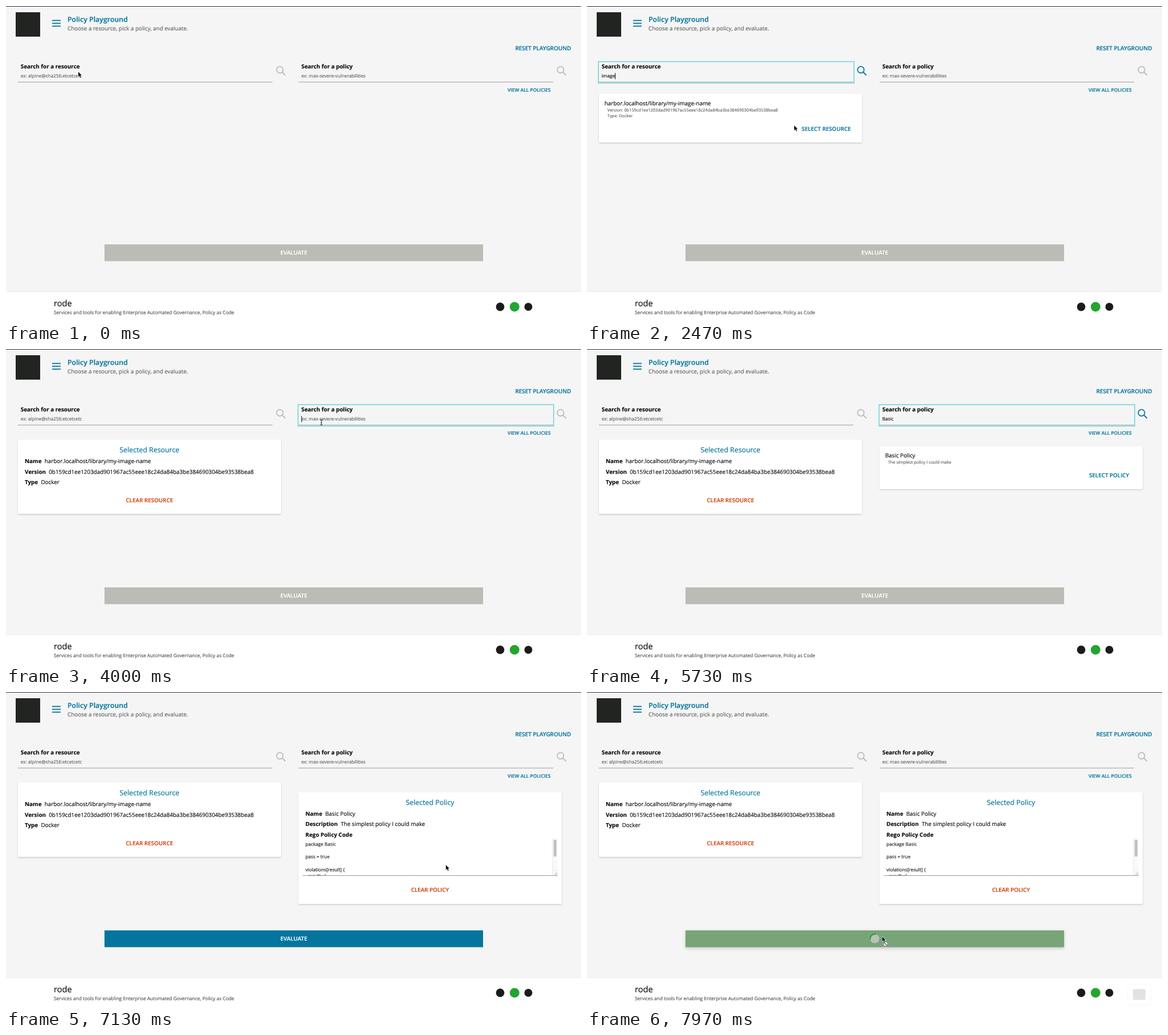
These frames come from a looping animation (1010 by 555 pixels, 8 s). An HTML page with a canvas:

```html
<!DOCTYPE html>
<html lang="en">
<head>
<meta charset="utf-8">
<title>Policy Playground</title>
<style>
html, body { margin: 0; width: 100%; height: 100%; overflow: hidden; background: #f5f5f5; }
canvas { display: block; width: 1010px; height: 555px; }
</style>
</head>
<body>
<canvas id="stage" width="1010" height="555"></canvas>
<script>
const ctx = document.getElementById('stage').getContext('2d');
const LOOP = 8000;
const FAMILY = '"Open Sans", "Noto Sans", sans-serif';
const HASH = '0b159cd1ee1203dad901967ac55eee18c24da84ba3be384690304be93538bea8';
const IMAGE = 'harbor.localhost/library/my-image-name';
const SUMMARY = 'The simplest policy I could make';

const BLUE = [5, 117, 158], GREY = [187, 188, 181], GREEN = [16, 122, 67], PALE = [119, 165, 119];
const INK = '#111', DIM = '#666', RED = '#d2450f', RULE = '#808080';
const MD = 9.87, SM = 8.21, XS = 7.4, LG = 12.38;

// Key moments in ms
const T = {
  focusA: 30, typeA: [900, 1020, 1150, 1290, 1430], listA: 1630, pickA: 2770,
  focusB: 3600, typeB: [4400, 4500, 4600, 4700, 4800], listB: 4980, pickB: 6420,
  send: 7670, toast: 7850
};

// Pointer moves: start, end, from, bend, to
const MOVES = [
  [400, 670, 127, 119, 132, 118, 137, 117],
  [1930, 2730, 137, 117, 323, 216, 415, 217],
  [2790, 3570, 415, 217, 500, 185, 554, 129],
  [5740, 6310, 554, 129, 760, 185, 922, 226],
  [6830, 7560, 922, 226, 720, 335, 518.5, 431]
];

const clamp = v => Math.max(0, Math.min(1, v));
const smooth = u => u * u * (3 - 2 * u);
const rgb = c => `rgb(${c.map(Math.round).join(',')})`;
const mix = (a, b, u) => a.map((v, i) => v + (b[i] - v) * u);

// CSS "ease" curve: cubic-bezier(.25, .1, .25, 1)
function ease(x) {
  x = clamp(x);
  let lo = 0, hi = 1, s = x;
  for (let i = 0; i < 16; i++) {
    s = (lo + hi) / 2;
    const bx = .75 * s * (1 - s) * (1 - s) + .75 * s * s * (1 - s) + s ** 3;
    if (bx < x) lo = s; else hi = s;
  }
  return .3 * s * (1 - s) * (1 - s) + 3 * s * s * (1 - s) + s ** 3;
}
const since = (t, start, span) => ease((t - start) / span);

// A hairline stroke gives the slightly heavier stems of smoothed text
function text(str, x, y, size, color = INK, weight = 400, align = 'left') {
  ctx.font = `${weight} ${size}px ${FAMILY}`;
  ctx.textRendering = 'geometricPrecision';
  ctx.textAlign = align;
  ctx.fillStyle = ctx.strokeStyle = color;
  ctx.lineWidth = .18;
  ctx.fillText(str, x, y);
  ctx.strokeText(str, x, y);
  return ctx.measureText(str).width;
}

function box(x, y, w, h, fill) {
  ctx.fillStyle = fill;
  ctx.fillRect(x, y, w, h);
}

function disc(x, y, r, fill) {
  ctx.beginPath();
  ctx.arc(x, y, r, 0, 7);
  ctx.fillStyle = fill;
  ctx.fill();
}

function line(x1, y1, x2, y2, color, width) {
  ctx.beginPath();
  ctx.moveTo(x1, y1);
  ctx.lineTo(x2, y2);
  ctx.strokeStyle = color;
  ctx.lineWidth = width;
  ctx.stroke();
}

function shadow(alpha, blur, dy, draw) {
  ctx.save();
  ctx.shadowColor = `rgba(0,0,0,${alpha})`;
  ctx.shadowBlur = blur;
  ctx.shadowOffsetY = dy;
  draw();
  ctx.restore();
}

const card = (x, y, w, h) => shadow(.18, 2.5, 1, () => box(x, y, w, h, '#fff'));

function pair(name, value, x, y) {
  const w = text(name, x, y, MD, INK, 700);
  text(value, x + w + 5.2, y, MD);
}

function page() {
  box(0, 0, 1010, 555, '#f5f5f5');
  box(0, 0, 1010, 1, '#2b2a45');
  box(17, 11, 43, 43, '#222422');
  for (const y of [25.5, 30.5, 35.5]) line(81, y, 96, y, rgb(BLUE), 1.9);
  text('Policy Playground', 108, 28.3, LG, rgb(BLUE), 600);
  text('Choose a resource, pick a policy, and evaluate.', 108, 42.5, MD, DIM);
  text('RESET PLAYGROUND', 992.5, 78.4, 9.95, rgb(BLUE), 600, 'right');
  text('VIEW ALL POLICIES', 956.6, 151.1, 8.42, rgb(BLUE), 600, 'right');
  box(0, 503, 1010, 1, '#ececec');
  box(0, 504, 1010, 51, '#fff');
  text('rode', 84, 529.4, 14.65, INK);
  text('Services and tools for enabling Enterprise Automated Governance, Policy as Code', 84, 543, 8.4, '#555');
  disc(868, 530, 7.4, '#1b1b1b');
  disc(893.3, 530, 8.5, '#23a52f');
  disc(917.5, 530, 7, '#1b1b1b');
}

function field(x, label, hint, value, ring, caret, glow) {
  text(label, x + 4.7, 109.6, MD, INK, 700);
  const w = value ? text(value, x + 4.7, 126.4, SM) : 0;
  if (!value) text(hint, x + 4.7, 126.4, SM, DIM);
  line(x, 134, x + 447, 134, RULE, .8);
  if (ring > 0) {
    ctx.globalAlpha = ring;
    ctx.strokeStyle = '#8edbe6';
    ctx.lineWidth = 2;
    ctx.strokeRect(x - 1, 98, 449, 37.7);
    ctx.globalAlpha = 1;
  }
  if (caret) box(x + 4.7 + w, 118, 1, 11, INK);
  const color = rgb(mix(GREY, BLUE, glow));
  ctx.beginPath();
  ctx.arc(x + 460, 112.4, 5.7, 0, 7);
  ctx.strokeStyle = color;
  ctx.lineWidth = 1.7;
  ctx.stroke();
  line(x + 464, 116.4, x + 469.7, 122, color, 2);
}

// Typed value and blinking caret for a field focused from start to end
function typing(t, word, keys, start, end) {
  if (t < start + 100 || t >= end) return { value: '', caret: false };
  const n = keys.filter(k => t >= k).length;
  const last = n ? keys[n - 1] : start + 130;
  return { value: word.slice(0, n), caret: Math.floor((t - last) / 500) % 2 === 0 };
}

function resource(t) {
  const typed = typing(t, 'image', T.typeA, T.focusA, T.pickA);
  const ring = t < T.pickA ? clamp((t - T.focusA) / 100) : 0;
  const glow = since(t, T.typeA[0], 200) - since(t, T.pickA, 200);
  field(21, 'Search for a resource', 'ex: alpine@sha256:etcetcetc', typed.value,
    ring, typed.caret, glow);
  if (t >= T.pickA) {
    card(21, 159.5, 462, 131);
    text('Selected Resource', 252, 182, LG, rgb(BLUE), 400, 'center');
    pair('Name', IMAGE, 33, 201);
    pair('Version', HASH, 33, 219.6);
    pair('Type', 'Docker', 33, 238);
    text('CLEAR RESOURCE', 252, 269.6, MD, RED, 600, 'center');
  } else if (t >= T.listA) {
    card(21, 154.5, 462, 86);
    text(IMAGE, 30.7, 174.5, MD);
    text('Version: ' + HASH, 35.7, 185.7, XS, DIM);
    text('Type: Docker', 35.7, 196.2, XS, DIM);
    text('SELECT RESOURCE', 463.5, 219.6, MD, rgb(BLUE), 600, 'right');
  }
}

function codeBox() {
  ctx.save();
  ctx.beginPath();
  ctx.rect(521, 258, 448, 65.5);
  ctx.clip();
  ['package Basic', '', 'pass = true', '', 'violations[result] {', '  result:={']
    .forEach((row, i) => text(row, 526, 271.2 + i * 11.13, SM, '#222'));
  box(959.5, 258, 9.5, 66, '#fafafa');
  box(959.5, 258, 1, 66, '#e8e8e8');
  ctx.beginPath();
  ctx.roundRect(961.8, 260, 5.2, 30, 2.6);
  ctx.fillStyle = '#c1c1c1';
  ctx.fill();
  box(960, 314, 9, 1, '#e8e8e8');
  line(963, 322.5, 968, 317.5, '#888', .8);
  line(966, 322.5, 968, 320.5, '#888', .8);
  ctx.restore();
  line(521, 323.5, 969, 323.5, RULE, .8);
}

function policy(t) {
  const typed = typing(t, 'Basic', T.typeB, T.focusB, T.pickB);
  const ring = t < T.pickB ? clamp((t - T.focusB) / 130) : 0;
  const glow = since(t, T.typeB[0], 200) - since(t, T.pickB, 200);
  field(514, 'Search for a policy', 'ex: max-severe-vulnerabilities', typed.value,
    ring, typed.caret, glow);
  if (t >= T.pickB) {
    card(513.5, 176.5, 462.5, 197);
    text('Selected Policy', 744.8, 198.6, LG, rgb(BLUE), 400, 'center');
    pair('Name', 'Basic Policy', 526, 217.7);
    pair('Description', SUMMARY, 526, 236.2);
    text('Rego Policy Code', 526, 254.7, MD, INK, 700);
    codeBox();
    text('CLEAR POLICY', 744.8, 352.3, MD, RED, 600, 'center');
  } else if (t >= T.listB) {
    card(513.5, 171, 462.5, 76);
    text('Basic Policy', 523.7, 191.1, MD);
    text(SUMMARY, 528.7, 202.2, XS, DIM);
    text('SELECT POLICY', 952.3, 225.7, MD, rgb(BLUE), 600, 'right');
  }
}

function pointer(t) {
  let p = [127, t < T.focusA ? 116 : 119];
  for (const [a, b, x0, y0, cx, cy, x1, y1] of MOVES) {
    if (t < a) break;
    const u = smooth(clamp((t - a) / (b - a))), v = 1 - u;
    p = [v * v * x0 + 2 * u * v * cx + u * u * x1, v * v * y0 + 2 * u * v * cy + u * u * y1];
  }
  return p;
}

const inside = ([x, y], l, t, r, b) => x >= l && x <= r && y >= t && y <= b;
const overButton = p => inside(p, 173, 420, 838, 450);

// First moment the pointer enters the button
let hoverAt = 6830;
while (!overButton(pointer(hoverAt))) hoverAt += 10;

function button(t) {
  let color = mix(GREY, BLUE, since(t, T.pickB, 130));
  color = mix(color, GREEN, since(t, hoverAt, 150));
  const press = since(t, T.send, 220);
  color = mix(color, PALE, press);
  const lift = since(t, hoverAt, 150) * (.1 + .08 * press);
  shadow(lift, 6, 2, () => box(173, 420, 665, 29.6, rgb(color)));
  if (t < T.send + 30) {
    text('EVALUATE', 505.6, 438.4, MD, '#fff', 600, 'center');
    return;
  }
  disc(505.4, 434.6, 8, '#bdbfba');
  const turn = Math.PI * (.95 + (t - 7970) / 500);
  ctx.beginPath();
  ctx.arc(505.4, 434.6, 8, turn, turn + 2);
  ctx.strokeStyle = '#1fa82f';
  ctx.lineWidth = 2.2;
  ctx.stroke();
}

function toast(t) {
  ctx.globalAlpha = clamp((t - T.toast) / 110);
  shadow(.05, 5, 0, () => box(951, 516, 38, 34, '#fff'));
  ctx.beginPath();
  ctx.roundRect(959, 523.5, 22, 19, 2);
  ctx.fillStyle = '#e2e2e2';
  ctx.fill();
  ctx.globalAlpha = 1;
}

function outline(d, fill, edge, width) {
  const p = new Path2D(d);
  ctx.lineJoin = 'round';
  ctx.lineWidth = width;
  ctx.strokeStyle = edge;
  ctx.stroke(p);
  ctx.fillStyle = fill;
  ctx.fill(p);
}

function cursor(t) {
  const typingNow = (t >= T.typeA[0] && t < 1930) || (t >= T.typeB[0] && t < 5740);
  if (typingNow) return;
  const p = pointer(t);
  const inField = inside(p, 21, 98, 468, 134) || inside(p, 514, 98, 961, 134);
  const onLink = (t < T.pickA && inside(p, 374, 207, 466, 225)) ||
    (t > T.listB && t < T.pickB && inside(p, 879, 214, 955, 231));
  const busy = t >= T.send + 60;
  ctx.save();
  ctx.translate(p[0], p[1]);
  if (inField && t >= T.focusA) {
    const d = 'M-2-4.5Q0-4.5 0-3Q0-4.5 2-4.5M0-3V3.5M-2 5Q0 5 0 3.5Q0 5 2 5M-1 1H1';
    ctx.strokeStyle = '#222';
    ctx.lineWidth = 1;
    ctx.stroke(new Path2D(d));
  } else if (!busy && (onLink || overButton(p))) {
    outline('M-.8 0Q0-.8.8 0V3.5L5.5 4.6Q6.3 5 6 6.5L5 9.5H-.5L-3.4 6Q-3.6 4.8-2.2 5.2L-.8 6.3Z', '#fff', '#222', 1);
  } else {
    outline('M0 0V8.6L2 6.8L3.5 10.2L5 9.5L3.5 6.2H6.2Z', '#111', '#fff', 1.1);
    if (busy) {
      disc(6, 13, 5.2, '#fff');
      ctx.beginPath();
      ctx.arc(6, 13, 4.2, 0, 7);
      ctx.strokeStyle = '#555';
      ctx.lineWidth = 1.3;
      ctx.stroke();
      line(3, 10, 9, 16, '#555', 1.3);
    }
  }
  ctx.restore();
}

function draw(t) {
  page();
  resource(t);
  policy(t);
  button(t);
  toast(t);
  cursor(t);
}

const begin = performance.now();
function tick() {
  draw((performance.now() - begin) % LOOP);
  requestAnimationFrame(tick);
}
tick();
</script>
</body>
</html>
```
